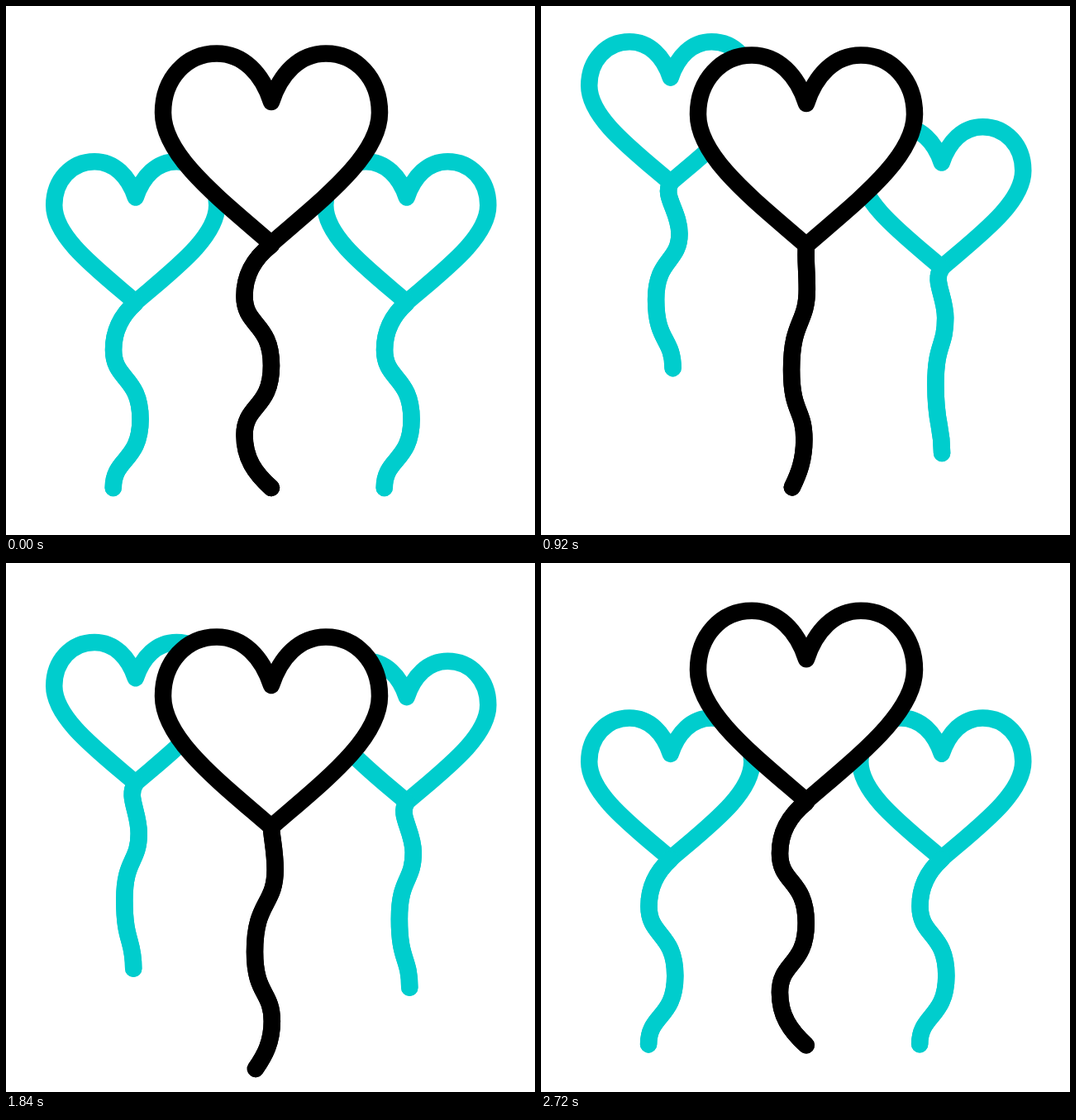
Animation of 640x640 px, one loop 2760 ms. Source, as an HTML page with a canvas:

```html
<!DOCTYPE html>
<html lang="en">
<head>
<meta charset="utf-8">
<title>Heart balloons</title>
<style>
  html, body { margin: 0; width: 100%; height: 100%; overflow: hidden; background: #fff; }
  canvas { display: block; width: 640px; height: 640px; }
</style>
</head>
<body>
<canvas id="stage" width="640" height="640"></canvas>
<script>
const ctx = document.getElementById('stage').getContext('2d');
const LOOP = 2760, STEP = 40;
const TEAL = '#00cdcd';
const REACH = [0.25, 0.44, 0.62, 0.44, 0.28]; // handle length at each string knot

// Keys [time, value]: start at 0, swing a, b, a, and return to 0.
const swing = (first, a, b, gap = 720) =>
  [[0, 0], [first, a], [first + gap, b], [first + 2 * gap, a], [LOOP, 0]];

// Knots [x, y, lean] of a side string, x from the balloon's axis.
const sideKnots = (lean, a, y, b, c) => [[0, 359, lean], [a, y], [b, 500], [c, 583]];
const sideRest = sideKnots(-16, -26.7, 416, 5.8, -27);

const left = {
  color: TEAL, x: 156.75, top: 188.2, sx: 0.752, sy: 0.74,
  // The third entry sharpens the crest.
  rise: [[0, 0], [760, -167], [1440, -9], [2085, -141, 1.18], [LOOP, 0, 1.18]],
  sway: swing(760, 1, 0, 660),
  rest: sideRest,
  bent: sideKnots(-9, 17.2, 421, -21.7, 8)
};
const right = {
  ...left, x: 484.75,
  rise: swing(600, -92, 28),
  sway: swing(640, 1, 0),
  bent: sideKnots(-9, 20.2, 421, -14, 14.2)
};
const middle = {
  color: '#000', x: 321, top: 57.5, sx: 1, sy: 1,
  rise: swing(560, 42, -38),
  sway: swing(640, 1, 0),
  rest: [[0, 289, -20], [-32.5, 351], [0, 435], [-32.5, 519], [0, 583, 20]],
  bent: [[0, 289, 8], [17.7, 335], [-27, 440], [12.5, 524], [-25.8, 579, -22]]
};

const lerp = (a, b, p) => a + (b - a) * p;
const smooth = u => u * u * (3 - 2 * u);

function valueAt(keys, t) {
  const i = keys.findIndex(key => t < key[0]);
  const [t0, v0] = keys[i - 1];
  const [t1, v1, power = 1] = keys[i];
  const p = smooth((t - t0) / (t1 - t0));
  return lerp(v0, v1, v1 < v0 ? p ** power : 1 - (1 - p) ** power);
}

// Both halves run from the notch over the lobe to the tip.
function drawHeart(b) {
  ctx.save();
  ctx.scale(b.sx, b.sy);
  ctx.beginPath();
  for (const s of [-1, 1]) {
    ctx.moveTo(0, 58.5);
    ctx.bezierCurveTo(s * 11, 24.5, s * 34, 0, s * 66, 0);
    ctx.bezierCurveTo(s * 103, 0, s * 131, 30.5, s * 131, 71.5);
    ctx.bezierCurveTo(s * 131, 124, s * 62, 176, 0, 230);
  }
  ctx.restore();
  ctx.fill();
  ctx.stroke();
}

function drawString(b, bend) {
  const knots = b.rest.map(([x, y, lean = 0], i) => {
    const [bx, by, bentLean = 0] = b.bent[i];
    return { x: lerp(x, bx, bend), y: lerp(y, by, bend), lean: lerp(lean, bentLean, bend) };
  });
  ctx.beginPath();
  ctx.moveTo(knots[0].x, knots[0].y);
  for (let i = 1; i < knots.length; i++) {
    const from = knots[i - 1], to = knots[i], dy = to.y - from.y;
    ctx.bezierCurveTo(
      from.x + from.lean, from.y + REACH[i - 1] * dy,
      to.x - to.lean, to.y - REACH[i] * dy,
      to.x, to.y);
  }
  ctx.stroke();
}

function drawBalloon(b, t) {
  ctx.strokeStyle = b.color;
  ctx.save();
  ctx.translate(b.x, valueAt(b.rise, t));
  drawString(b, valueAt(b.sway, t));
  ctx.translate(0, b.top);
  drawHeart(b);
  ctx.restore();
  // The heart's white fill covers the string's first cap, so the string goes on top again.
  ctx.save();
  ctx.translate(b.x, valueAt(b.rise, t));
  drawString(b, valueAt(b.sway, t));
  ctx.restore();
}

function render(now) {
  const t = Math.floor((now % LOOP) / STEP) * STEP;
  ctx.fillStyle = '#fff';
  ctx.fillRect(0, 0, 640, 640);
  ctx.lineWidth = 20.5;
  ctx.lineCap = ctx.lineJoin = 'round';
  for (const balloon of [left, right, middle]) drawBalloon(balloon, t);
  requestAnimationFrame(render);
}
render(performance.now());
</script>
</body>
</html>
```
